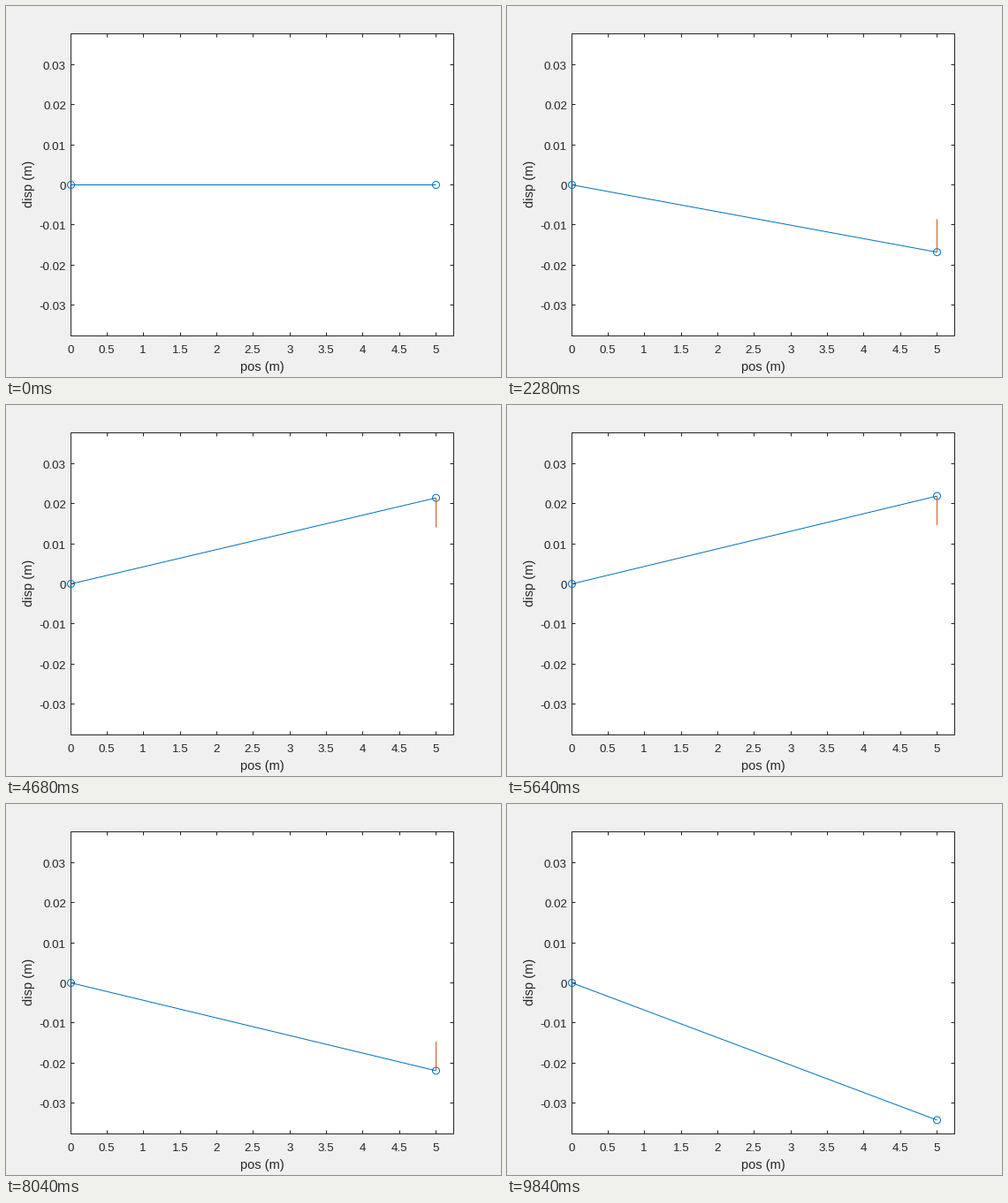
A matplotlib script that plays this animation: 560 by 420 pixels, repeating every 9.96 s.

```python
import math
import matplotlib.pyplot as plt
from matplotlib.animation import FuncAnimation

W, H, DPI = 560, 420, 100
FRAMES, INTERVAL = 83, 120
PX = 72 / DPI  # points per pixel

# Axes edges, given at pixel centres.
LEFT, RIGHT, TOP, BOTTOM = 73.5, 506.5, 31.5, 373.5
X_SCALE = 82.74
Y_SCALE = (BOTTOM - TOP) / 2 / 0.0377
ZERO_Y = (TOP + BOTTOM) / 2
TICK = 4

INK, BLUE, RED = "#262626", "#0072bd", "#d95319"
AMPLITUDE = 0.0344   # m
ARROW = 42.7         # px at top speed

plt.rcParams["font.family"] = "Liberation Sans"
plt.rcParams["path.snap"] = False
plt.rcParams["lines.solid_capstyle"] = "butt"
fig = plt.figure(figsize=(W / DPI, H / DPI), dpi=DPI, facecolor="#f0f0f0")
ax = fig.add_axes([0, 0, 1, 1])
ax.set_xlim(0, W)
ax.set_ylim(H, 0)
ax.axis("off")


def pixel_centre(v):
    return math.floor(v) + 0.5


def to_x(pos):
    return pixel_centre(LEFT - 0.5 + pos * X_SCALE)


def to_y(disp):
    return ZERO_Y - disp * Y_SCALE


def segment(x0, y0, x1, y1):
    ax.plot([x0, x1], [y0, y1], color=INK, lw=PX, zorder=2)


def label(x, y, text, size=13.33, ha="center", rotation=0):
    ax.text(x, y, text, fontsize=size * PX, color=INK, ha=ha,
            va="baseline", rotation=rotation, rotation_mode="anchor")


def ring(x, y):
    return ax.add_patch(plt.Circle((x, y), 4, fc="none", ec=BLUE, lw=PX,
                                   zorder=4))


def draw_axes():
    ax.add_patch(plt.Rectangle((LEFT, TOP), RIGHT - LEFT, BOTTOM - TOP,
                               fc="white", ec=INK, lw=PX, zorder=1))
    for i in range(11):
        x = to_x(i / 2)
        segment(x, BOTTOM, x, BOTTOM - TICK)
        segment(x, TOP, x, TOP + TICK)
        label(x - 0.5, 393, f"{i / 2:g}")
    for i in range(-3, 4):
        y = pixel_centre(to_y(i / 100))
        segment(LEFT, y, LEFT + TICK, y)
        segment(RIGHT, y, RIGHT - TICK, y)
        label(68, y + 5.7, f"{i / 100:g}", ha="right")
    label(290, 413, "pos (m)", 14.67)
    label(30, 201, "disp (m)", 14.67, rotation=90)


draw_axes()
tip_x = to_x(5)
bar, = ax.plot([], [], color=BLUE, lw=PX, zorder=4)
arrow, = ax.plot([], [], color=RED, lw=PX, zorder=5)
pivot = ring(LEFT, ZERO_Y)
tip = ring(tip_x, ZERO_Y)


def state(n):
    """Tip displacement (m) and relative velocity, settling to a steady swing."""
    growth = 1 - math.exp(-(n / 2.8) ** 1.5)
    lead = 0.079 * max(0, 1 - n / 48) ** 2
    phase = 2 * math.pi * (n / 8 - 0.235 + lead)
    return -AMPLITUDE * growth * math.cos(phase), growth * math.sin(phase)


def update(n):
    disp, speed = state(n)
    y = to_y(disp)
    bar.set_data([LEFT, tip_x], [ZERO_Y, y])
    tip.set_center((tip_x, y))
    arrow.set_data([tip_x, tip_x], [y, y - ARROW * speed])
    arrow.set_visible(abs(speed) > 0.15)  # none at the turning points
    return bar, tip, arrow


anim = FuncAnimation(fig, update, frames=FRAMES, interval=INTERVAL,
                     repeat=True, repeat_delay=0)
plt.show()
```
